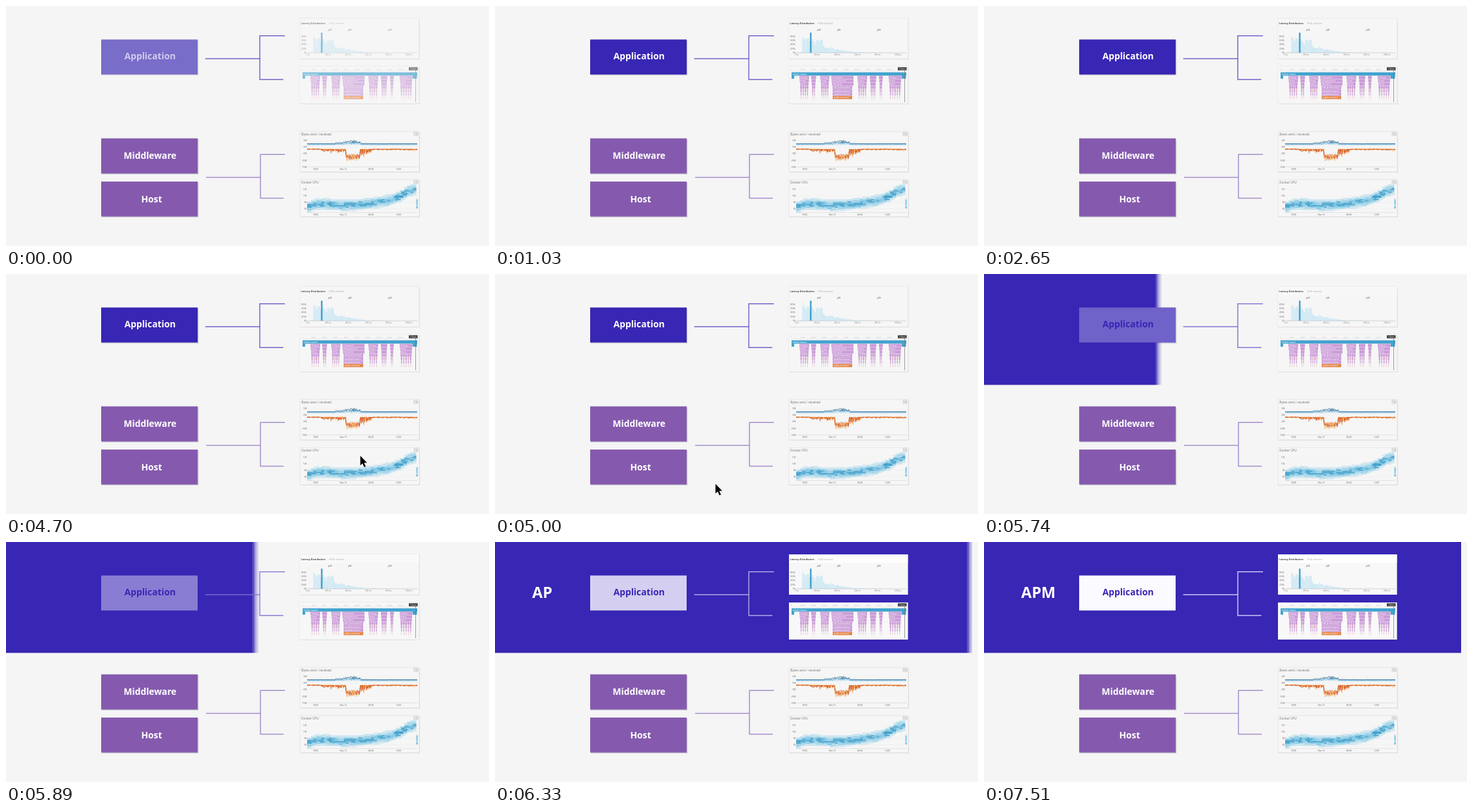
An HTML page that plays this animation: 741x369 px, repeating every 8000 ms.

```html
<!DOCTYPE html>
<html lang="en">
<head>
<meta charset="utf-8">
<title>Observability layers</title>
<style>
  html, body { margin: 0; width: 100%; height: 100%; overflow: hidden; background: #f5f5f5; }
  svg { display: block; width: 741px; height: 369px; }
  text { font-family: "Noto Sans", "Open Sans", sans-serif; }
  .label { font-size: 13.8px; font-weight: 600; text-anchor: middle; }
  .apm { font-size: 23.4px; font-weight: 600; fill: #fff; }
</style>
</head>
<body>
<svg id="stage" viewBox="0 0 741 369" xmlns="http://www.w3.org/2000/svg"></svg>
<script>
const LOOP = 8000;
const STEP = 1000 / 6.8; // the picture advances at 6.8 steps per second
const INDIGO = '#3826b4';

let seed = 11;
const rnd = () => {
  seed = (seed * 16807) % 2147483647;
  return seed / 2147483647;
};
const clamp = (v, a = 0, b = 1) => Math.min(b, Math.max(a, v));
const n2 = v => +v.toFixed(2);

const rect = (x, y, w, h, fill, extra = '') =>
  `<rect x="${n2(x)}" y="${n2(y)}" width="${n2(w)}" height="${n2(h)}" fill="${fill}" ${extra}/>`;
const text = (x, y, size, str, fill = '#777', extra = '') =>
  `<text x="${x}" y="${y}" font-size="${size}" fill="${fill}" ${extra}>${str}</text>`;
const path = (d, stroke, width, extra = '') =>
  `<path d="${d}" fill="none" stroke="${stroke}" stroke-width="${width}" ${extra}/>`;
const END = 'text-anchor="end"', MID = 'text-anchor="middle"', BOLD = 'font-weight="bold"';

// Piecewise linear curve through [x, y] points
const curve = pts => x => {
  for (let i = 1; i < pts.length; i++) {
    const [x0, y0] = pts[i - 1], [x1, y1] = pts[i];
    if (x <= x1) return y0 + (y1 - y0) * clamp((x - x0) / (x1 - x0));
  }
  return pts[pts.length - 1][1];
};

const plot = (fn, from = 462, to = 631, dx = 0.8) => {
  let d = '';
  for (let x = from; x <= to; x += dx) d += `${d ? 'L' : 'M'}${n2(x)} ${n2(fn(x))}`;
  return d;
};

function panel(x, y, w, h) {
  return rect(x + 1, y + 1, w, h, '#dadada') +
    rect(x, y, w, h, '#f6f6f6', 'stroke="#e0e0e0" stroke-width=".8"');
}

function latency() {
  let s = text(452.6, 28.2, 3.65, 'Latency Distribution', '#444', BOLD) +
    text(495.5, 28.2, 3.4, '99.4k selected', '#aaa');
  [['p50', 497], ['p95', 527.5], ['p99', 589]].forEach(([t, x]) => {
    s += text(x, 38.3, 3, t, '#444', MID);
  });
  ['80.0k', '60.0k', '40.0k', '20.0k', '0k'].forEach((t, i) => {
    s += text(460.6, 47.5 + i * 6.4, 3, t, '#666', END);
  });
  for (let i = 0; i < 6; i++)
    s += text(463 + i * 31, 76.2, 2.7, `${i * 200} ms`, '#888', MID);
  const height = curve([[463, 0.5], [470, 0.8], [471, 22], [476, 19], [481, 23], [486, 20],
    [490, 17], [495, 21], [501, 20], [503, 12], [506, 8.5], [514, 8.5], [522, 6],
    [535, 3.4], [550, 1.3], [575, 0.4], [620, 0]]);
  for (let x = 463; x < 615; x += 2.1) {
    const h = height(x) * (0.72 + rnd() * 0.42);
    s += rect(x, 72 - h, 2, h, '#d0e9f4');
  }
  return s + rect(483.2, 41, 2.4, 31, '#3f9fc9') +
    path('M461 72H631', '#bbb', 0.6);
}

function trace() {
  const pink = '#cb9cd8', blue = '#43a3ce', orange = '#e58548';
  let s = '';
  for (let i = 0; i < 10; i++)
    s += text(455 + i * 16.7, 97.9, 2.5, i ? `${i * 10} ms` : '0', '#888', MID);
  s += path('M455 100.2H631', '#ccc', 0.5) + rect(455, 102, 176, 5.2, blue) +
    rect(455, 107, 4, 4.8, blue) + rect(624, 107, 6.5, 4.8, blue) +
    text(456.5, 105.8, 3, 'update request', '#fff');

  const groups = [[467, 15, 4], [485, 7.5, 2], [499, 14, 4], [556, 15, 4],
    [575, 10, 3], [589, 6, 2], [604, 19.5, 5]];
  groups.forEach(([x, w, n]) => {
    for (let r = 0; r < 3; r++) s += rect(x + r * 0.5, 107.2 + r * 5, w - r, 5, pink);
    const gap = (w - 2) / n;
    for (let i = 0; i < n; i++) {
      const m = x + 1 + (i + 0.5) * gap;
      for (let r = 0; r < 4; r++) {
        const half = gap * (0.42 - r * 0.11);
        s += rect(m - half, 122.2 + r * 5.2, half * 2, 5.2,
          r === 3 || (r === 1 && i % 2) ? '#dfb3bd' : pink);
      }
    }
    if (w > 12) ['string_g…', 'string…', 'task_p…'].forEach((t, i) => {
      s += text(x + 1.3, 110.8 + i * 5.1, 2.7, t, '#fff');
    });
  });

  const rows = ['string_query', 'string_query-col', 'task_query', 'task_process-source',
    'mysql/fetch-source', 'mysql/fetch-action', 'update command'];
  rows.forEach((t, i) => {
    const x = i < 3 ? 516 + i * 0.5 : 518, w = i < 3 ? 34 - i * 0.5 : 30;
    s += rect(x, 107.2 + i * 5.15, w, 5.15, i === 6 ? orange : pink) +
      text(x + 1.2, 110.9 + i * 5.15, 2.8, t, '#fff');
  });
  for (let i = 0; i < 7; i++)
    s += path(`M460 ${n2(107.2 + i * 5.15)}H623`, '#f6f6f6', 0.45, 'opacity=".75"');
  return s + path('M628.5 99V148', '#777', 0.7) + rect(618, 94.2, 13.5, 4.6, '#3b3b3b') +
    text(624.8, 97.7, 2.9, '114 ms', '#fff', MID);
}

function timeAxis(y) {
  return ['18:00', 'Nov 15', '06:00', '12:00'].map((t, i) =>
    text(475 + i * 42.4, y, 3.2, t, '#666', MID)).join('');
}

function frame(y, title) {
  return text(453.3, y + 5.8, 4.75, title, '#777') +
    rect(626, y + 1, 6, 5, '#f3f3f3', 'stroke="#bbb" stroke-width=".6"') +
    text(629, y + 4.9, 3.2, '1d', '#777', MID);
}

function bytes() {
  let s = panel(451, 193, 183, 62) + frame(193, 'Bytes sent / received');
  ['5M', '0M', '-5M', '-10M', '-15M'].forEach((t, i) => {
    const y = 207 + i * 10.1;
    s += text(461.3, n2(y + 1.2), 3.2, t, '#666', END) +
      path(`M462 ${n2(y)}H631`, '#eaeaea', 0.4);
  });
  s += timeAxis(252) + path('M462 247.5H631', '#ccc', 0.5);

  const bump = curve([[504, 0], [507, 1.5], [520, 1.7], [523, 3.2], [542, 3.4], [545, 0.3], [562, 0]]);
  const blues = [['#a9d3ea', 214, 0.2], ['#5aaed6', 213.2, 0.5], ['#2f86ba', 212.4, 0.8], ['#1f5d86', 211.8, 1.2]];
  blues.forEach(([c, y, k]) => {
    s += path(plot(x => y - bump(x) * k * (0.3 + rnd() * 1.05) - rnd() * 0.5), c, 0.7);
  });

  const dip = curve([[462, 0.4], [482, 0.8], [486, 2.6], [505, 3.4], [520.5, 4], [522, 14.5],
    [542.5, 14], [543.5, 4], [547, 7], [560, 5], [562, 1], [600, 1.2], [631, 1.6]]);
  const reds = [['#f6c089', 219.6, 1.12], ['#f7ae5c', 219.4, 1.02], ['#f08c2c', 219.4, 0.86],
    ['#e0641f', 219.5, 0.7], ['#b8341c', 219.7, 0.95]];
  reds.forEach(([c, y, k], i) => {
    const line = x => {
      const d = dip(x);
      const noise = d > 10 ? 0.75 + rnd() * 0.4 : rnd() * rnd() * 2;
      return y + d * k * noise + rnd() * 0.8;
    };
    s += path(plot(line), c, 0.7, i === 4 ? 'stroke-dasharray="5 4"' : '');
  });
  return s;
}

function cpu() {
  let s = panel(451, 267, 183, 57) + frame(267, 'Docker CPU');
  ['120', '100', '80', '60'].forEach((t, i) => {
    const y = 282 + i * 9.9;
    s += text(461.3, n2(y + 1.2), 3.2, t, '#666', END) +
      path(`M462 ${n2(y)}H631`, '#eaeaea', 0.4);
  });
  s += timeAxis(322) + path('M462 317.5H631', '#ccc', 0.5);
  const level = curve([[462, 310], [470, 307], [484, 304], [500, 305], [515, 307], [532, 306],
    [548, 305], [565, 302.5], [585, 300], [598, 296], [608, 290], [618, 285], [629, 281]]);
  // Rows sit on a shared grid; each cell has its own width and density
  for (let y = 274; y < 317; y += 1.9) {
    for (let x = 462, w; x < 629; x += w) {
      w = Math.min(3.5 + rnd() * 6, 629.5 - x);
      const r = (y + 1 - level(x + w / 2)) / 1.9;
      const a = Math.exp(-r * r / 9) * (0.45 + rnd() * 0.75);
      if (a > 0.07)
        s += rect(x, y, w, 1.9, a > 0.7 ? '#2f97c8' : '#55b6de', `opacity="${n2(clamp(a + 0.1, 0, 0.9))}"`);
    }
  }
  for (let y = 296; y < 311; y += 1.9)
    s += rect(629.3, y, 2.6, 1.9, '#52b4de', `opacity="${n2(0.25 + rnd() * 0.6)}"`);
  return s;
}

const box = (y, h, fill) => rect(147, y + 1.2, 148.3, h, '#c4c0ce') + rect(146, y, 148, h, fill);
const label = (y, str, fill = '#fff', x = 221) =>
  `<text class="label" x="${x}" y="${y}" fill="${fill}">${str}</text>`;
const bracket = (x, y, joint, top, low, right) =>
  `M${x} ${y}H${joint}M428 ${top}H${joint}V${low}H${right}`;
const appLines = bracket(305.6, 81, 389.4, 45.8, 113, 425.5);

document.getElementById('stage').innerHTML = `
  <defs>
    <linearGradient id="feather">
      <stop offset="0" stop-color="${INDIGO}"/>
      <stop offset=".4" stop-color="${INDIGO}" stop-opacity=".4"/>
      <stop offset="1" stop-color="${INDIGO}" stop-opacity="0"/>
    </linearGradient>
    <clipPath id="band"><rect width="732" height="170.6"/></clipPath>
  </defs>
  ${rect(0, 0, 741, 369, '#f5f5f5')}
  ${path(appLines, '#7265cb', 1.5)}
  ${path(bracket(307, 263.5, 390.4, 228.2, 295.5, 426), '#a48fcb', 1.5)}
  ${box(203.5, 54, '#855aae')}${label(235.3, 'Middleware')}
  ${box(269.9, 53.7, '#855aae')}${label(302, 'Host', '#fff', 223.5)}
  ${bytes()}${cpu()}
  <g id="appBox">${box(51.5, 53.8, INDIGO)}</g>
  <g id="appText">${label(82, 'Application')}</g>
  ${panel(451, 19, 182.5, 62)}${panel(451, 93, 182.5, 57)}
  <g clip-path="url(#band)">
    <rect id="wipe" height="171" fill="${INDIGO}"/>
    <rect id="edge" width="10" height="171" fill="url(#feather)"/>
  </g>
  ${rect(451, 19.2, 182.4, 61.8, '#f6f6f6')}${rect(451, 93, 182.4, 57, '#f6f6f6')}
  <g id="over">
    ${path(appLines, '#cbc6f2', 1.5)}
    ${rect(146, 51.5, 148, 53.8, '#fbfaff')}${label(82, 'Application', INDIGO)}
    ${rect(451, 19.2, 182.4, 61.8, '#f8f8f8')}${rect(451, 19.2, 182.4, 12.8, '#fff')}
    ${rect(451, 93, 182.4, 57, '#f9f9f9')}
  </g>
  <g id="appCharts">${latency()}${trace()}</g>
  <text class="apm" id="apm" x="57" y="86"></text>
  <path id="cursor" d="M0 0V14.8L3.4 11.7L6 17.6L8.4 16.6L5.8 10.8H10.4Z" fill="#000"
    stroke="#fff" stroke-width=".7" paint-order="stroke"/>`;

const el = Object.fromEntries(
  ['appBox', 'appText', 'appCharts', 'wipe', 'edge', 'over', 'apm', 'cursor']
    .map(id => [id, document.getElementById(id)]));
const set = (e, name, v) => e.setAttribute(name, v);

const cursorX = curve([[4411, 711], [4706, 543.5], [5294, 133]]);
const cursorY = curve([[4411, 246], [4706, 279.5], [5294, 366]]);

function draw(time) {
  const t = Math.floor((time + 8) / STEP) * STEP;

  const appear = clamp(0.65 + t * 0.00088);
  [el.appBox, el.appText, el.appCharts].forEach(e => set(e, 'opacity', appear));

  const front = 32.5 + 0.784 * (t - 5441);
  set(el.wipe, 'width', clamp(front, 0, 732));
  set(el.edge, 'x', front);
  set(el.over, 'opacity', clamp((t - 5416) * 0.00088));

  const typed = clamp(Math.floor((t - 6170) / STEP) + 1, 0, 3);
  el.apm.textContent = 'APM'.slice(0, typed);

  const moving = t > 4400 && t < 5400;
  set(el.cursor, 'visibility', moving ? 'visible' : 'hidden');
  set(el.cursor, 'transform', `translate(${n2(cursorX(t))} ${n2(cursorY(t))})`);
}

const start = performance.now();
function tick() {
  draw((performance.now() - start) % LOOP);
  requestAnimationFrame(tick);
}
tick();
</script>
</body>
</html>
```
